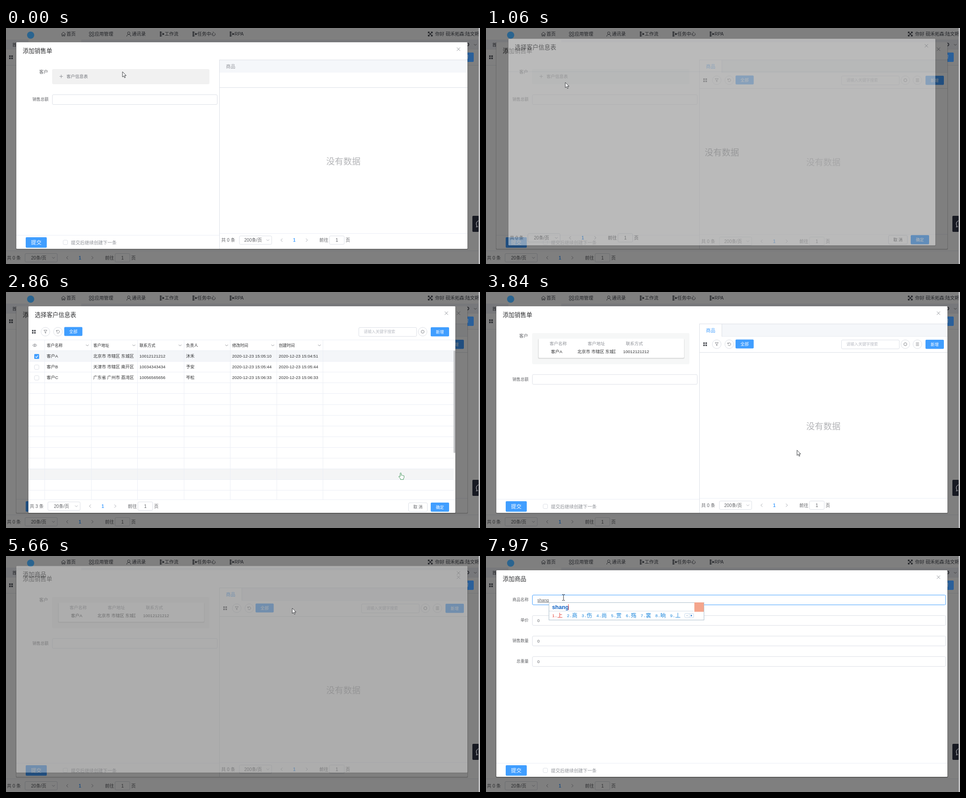
Recreate the animation shown at these times as an HTML page. Size 1058 by 529 pixels, loop 8 s.

```html
<!DOCTYPE html>
<html lang="zh">
<head>
<meta charset="utf-8">
<style>
html, body { margin: 0; width: 100%; height: 100%; overflow: hidden; background: #7f7f7f; }
svg { display: block; width: 1058px; height: 529px; }
text { font-family: "Liberation Sans", "Noto Sans CJK SC", "Noto Sans CJK", sans-serif; white-space: pre; }
</style>
</head>
<body>
<svg id="stage" viewBox="0 0 1058 529"></svg>
<script>
const BLUE = '#409eff', LINE = '#dcdfe6', GRID = '#ebeef5', INK = '#303133', GRAY = '#606266', SOFT = '#909399';

// Drawing helpers; text is placed by its vertical centre.
const text = (x, cy, s, size = 10, fill = GRAY, more = '') =>
  `<text x="${x}" y="${cy + size * 0.37}" font-size="${size}" fill="${fill}" ${more}>${s}</text>`;
const mid = (x, cy, s, size, fill, more = '') => text(x, cy, s, size, fill, 'text-anchor="middle" ' + more);
const rect = (x, y, w, h, fill, more = '') =>
  `<rect x="${x}" y="${y}" width="${w}" height="${h}" fill="${fill}" ${more}/>`;
const box = (x, y, w, h, stroke = LINE, fill = '#fff', more = '') =>
  rect(x + .5, y + .5, w - 1, h - 1, fill, `stroke="${stroke}" rx="2.5" ${more}`);
const path = (d, stroke, w = 1, more = '') => `<path d="${d}" fill="none" stroke="${stroke}" stroke-width="${w}" ${more}/>`;
const hline = (x1, x2, y, c = LINE) => rect(x1, y, x2 - x1, 1, c);
const vline = (x, y1, y2, c = LINE) => rect(x, y1, 1, y2 - y1, c);
const group = (id, body) => `<g id="${id}">${body}</g>`;
const chevron = (x, y, c) => path(`M${x - 3} ${y - 1.5}l3 3 3-3`, c, .9);
const cross = (x, y) => path(`M${x - 3.7} ${y - 3.7}l7.4 7.4m0-7.4l-7.4 7.4`, SOFT, 1);
const tiles = (x, y, c) => [[-4, -4], [.8, -4], [-4, .8], [.8, .8]].map(([a, b]) => rect(x + a, y + b, 3.4, 3.4, c)).join('');
const ring = (x, y, r, c, w = 1, fill = 'none') => `<circle cx="${x}" cy="${y}" r="${r}" fill="${fill}" stroke="${c}" stroke-width="${w}"/>`;
const button = (x, y, w, h, label, size = 9, id = '') =>
  rect(x, y, w, h, BLUE, `rx="2" id="${id}"`) + mid(x + w / 2, y + h / 2, label, size, '#fff');
const panel = (x, w, title) =>
  rect(x - 1, 33, w + 2, 464, '#000', 'opacity=".18" rx="2"') + rect(x, 32, w, 463, '#fff', 'rx="1.5"') +
  text(x + 14.3, 51, title, 13.2, INK) + cross(x + w - 20, 47.5);

function pager(x, cy, count, size, dim) {
  const c = dim ? '#2b2c2e' : GRAY, border = dim ? '#6c6d70' : LINE, fill = dim ? '#7f7f7f' : '#fff', soft = dim ? '#4a4b4e' : '#a5a8af';
  return text(x, cy, `共 ${count} 条`, 10, c) + box(x + 40, cy - 10, 73, 20, border, fill) +
    mid(x + 71, cy, size + '条/页', 10, c) + chevron(x + 104, cy, soft) +
    path(`M${x + 136.5} ${cy - 3.5}l-3.5 3.5 3.5 3.5M${x + 189} ${cy - 3.5}l3.5 3.5-3.5 3.5`, soft) +
    mid(x + 163, cy, '1', 10, dim ? '#1f4f80' : BLUE, 'font-weight="700"') +
    text(x + 219, cy, '前往', 10, c) + box(x + 241, cy - 10, 34, 20, border, fill) +
    mid(x + 258, cy, '1', 10, c) + text(x + 277.5, cy, '页', 10, c);
}

function toolbar(x, sx, cy, list, id) {
  const end = sx + (list ? 188 : 161), ic = '#70737a';
  return tiles(x, cy, '#4a4d53') + ring(x + 26, cy, 9.8, LINE) + ring(x + 54, cy, 9.8, LINE) +
    path(`M${x + 22.5} ${cy - 3.5}h7l-2.7 3.5v3.5l-1.6-1v-2.5z`, ic, .8) +
    path(`M${x + 51} ${cy - 1.5}a3.3 3.3 0 1 1 0 3M${x + 50.5} ${cy - 3.5}v2.5h2.5`, ic, .9) +
    button(x + 68, cy - 10.5, 40.5, 20, '全部', 9.3) +
    box(sx, cy - 10, 130, 21) + text(sx + 11.5, cy, '请输入关键字搜索', 8.8, '#b9bcc4') +
    ring(sx + 143, cy, 9.8, LINE) + ring(sx + 143, cy, 3.4, ic, .9) +
    (list ? ring(sx + 170, cy, 9.8, LINE) + path(`M${sx + 166.5} ${cy - 3}h7m-7 3h7m-7 3h7`, ic, .9) : '') +
    button(end, cy - 10, 41, 20.5, '新增', 9, id);
}

const submitBar = right =>
  hline(23, right, 464, GRID) + button(44, 469, 47, 23.5, '提交', 11.7) +
  box(127, 475, 11, 11) + text(145, 481, '提交后继续创建下一条', 10.2, '#8f9298');

function page() {
  const c = '#202226';
  const flow = x => [8, 12, 16].map(y => rect(x - 4.5, y, 3, 3, c)).join('') +
    path(`M${x - 2} 9.5h3m-3 4h4m-4 4h3`, c, .9) + ring(x + 3, 13.5, 1.6, c, 1, c);
  const icons = path('M123.5 14l4.7-5 4.7 5m-8-1v5h2.3v-3h2v3h2.3v-5', c, .9) +
    [[188, 11], [194, 11], [188, 17], [194, 17]].map(([x, y]) => ring(x, y, 2.2, c, .9)).join('') +
    ring(274, 11.5, 2.8, c, .9) + path('M269.5 19c0-6 9-6 9 0', c, .9) + [348, 421, 504].map(flow).join('');
  const nav = [[135, '首页'], [198, '应用管理'], [281, '通讯录'], [354, '工作流'], [427, '任务中心'], [510, 'RPA']];
  return rect(0, 0, 1058, 529, '#7f7f7f') + rect(0, 26, 1055, 22, '#77787b') + rect(50, 26, 118, 22, '#7f7f7f') +
    hline(0, 1055, 47, '#727376') + hline(0, 1055, 83, '#737477') + hline(0, 1055, 499, '#757679') +
    `<circle cx="55" cy="16" r="8" fill="#2a648f"/>` + icons +
    nav.map(([x, s]) => text(x, 13.5, s, 10.3, c)).join('') +
    path('M942.5 9l9 9m0-9l-9 9M942.5 12v-3h3m3 0h3v3m0 3v3h-3m-3 0h-3v-3', c, 1.4) +
    text(958, 13.5, '你好 砚禾拓森:陆文朔', 10.3, c) + text(14, 37, '首页', 9.5, c) +
    ring(1030, 37, 3, c, 1.5) + chevron(1047.5, 37.5, '#333') + tiles(11, 65.5, '#25272b') +
    rect(1003, 55, 41, 21, '#2a609a', 'rx="2"') + mid(1023.5, 65, '新增', 9, '#a0a0a0') +
    pager(2, 515, 0, 20, true) + rect(1041, 421, 15, 36, '#171922', 'rx="2"') +
    path('M1056 432a7 7 0 0 0-5 11l-1 3 4-1', '#a8a8ac', 1.2) + rect(1055, 0, 3, 529, '#c4c4c6');
}

function orderForm() {
  const field = y => box(103, y, 369, 23) + text(59, y + 11, '销售总额', 9);
  const empty = rect(103, 92, 351, 34, '#f1f1f1', 'rx="3" id="pick"') +
    path('M119.5 108.5h7.5m-3.75-3.75v7.5', SOFT) + text(135, 108.5, '客户信息表', 9.6, '#74777d') + field(149);
  const filled = rect(103, 92, 351, 70, '#f6f7f7', 'rx="3"') + rect(116, 105, 327, 45, '#000', 'opacity=".1" rx="3"') +
    rect(117.5, 104.5, 324.5, 43, '#fff', 'rx="2"') +
    [[142, '客户名称'], [227, '客户地址'], [312, '联系方式']].map(([x, s]) => text(x, 115, s, 9.6, SOFT)).join('') +
    text(145, 133, '客户A', 9.5, INK) + `<svg x="204" y="124" width="85" height="18">${text(0, 9, '北京市 市辖区 东城区', 9.5, INK)}</svg>` +
    text(306, 133, '10012121212', 9.5, INK) + field(184.5);
  const nothing = y => mid(753, y, '没有数据', 19.2, '#b4b5b8');
  const early = text(491, 86.5, '商品', 10.4, SOFT) + hline(477, 1030, 133) + nothing(299) + hline(477, 1030, 460, GRID) + pager(480.5, 475.5, 0, 200);
  const ready = hline(527, 1030, 99, '#e8ebf1') + rect(477, 72, 49, 29, '#fff') + vline(526, 72, 100) + text(491, 86.5, '商品', 10.4, BLUE) +
    toolbar(489, 793, 117, true, 'add') + hline(477, 1030, 135) + nothing(301) + hline(477, 1030, 462, GRID) + pager(480.5, 478, 0, 200);
  return panel(23, 1007, '添加销售单') + text(74, 98, '客户', 10) + group('empty', empty) + group('filled', filled) +
    rect(477, 71, 553, 29, '#f5f7fa') + hline(476, 1030, 71) + group('early', early) + group('ready', ready) +
    vline(476, 71, 495) + submitBar(476);
}

const ROW = 24.1, COLS = [86, 190, 293, 397, 500, 604, 707];

function picker() {
  const heads = ['客户名称', '客户地址', '联系方式', '负责人', '修改时间', '创建时间'];
  const rows = [
    ['客户A', '北京市 市辖区 东城区', '10012121212', '沐禾', '15:05:10', '15:04:51'],
    ['客户B', '天津市 市辖区 南开区', '10034343434', '予安', '15:05:44', '15:05:44'],
    ['客户C', '广东省 广州市 荔湾区', '10056565656', '岑松', '15:06:33', '15:06:33']];
  let grid = hline(50, 1003, 107, GRID) + hline(50, 1003, 131, GRID);
  for (let i = 1; i < 14; i++) grid += hline(50, 999, Math.round(131 + i * ROW), GRID);
  grid += COLS.map(x => vline(x, 107, 465, GRID)).join('') + hline(50, 1003, 465, GRID);
  grid += heads.map((s, i) => text(COLS[i] + 5, 119.5, s, 8.9, INK, 'font-weight="500"') + chevron(COLS[i] + 95.5, 119.5, '#7d8087')).join('');
  grid += path('M59.5 119.5q4.7-6 9.4 0q-4.7 6-9.4 0z', '#70737a', .9) + ring(64.2, 119.5, 1.3, '#70737a', .9);
  const cells = rows.map((r, i) => box(63, 139 + i * 24, 11, 11) + r.map((s, j) =>
    text(COLS[j] + 4.7, 143 + i * 24, j > 3 ? '2020-12-23 ' + s : s, 9.5, INK)).join('')).join('');
  return panel(50, 953, '选择客户信息表') +
    group('blank', hline(50, 1003, 105, GRID) + mid(526.5, 286.5, '没有数据', 19.2, '#b4b5b8') + pager(53, 478, 0, 20)) +
    group('table', rect(50, 131, 949, 24, '#f4f6f9', 'id="current"') + rect(50, 131, 949, 24, '#f4f5f6', 'id="hover"') +
      toolbar(62, 787, 89, false) + grid + group('cells', cells + rect(999, 131, 4, 230, '#c2c3c6', 'rx="2"')) +
      group('tick', rect(63, 139, 11, 11, BLUE, 'rx="1.5"') + path('M65.6 144.6l2.2 2.3 3.8-4.6', '#fff', 1.3)) + pager(53, 480, 3, 20)) +
    box(898, 472, 43, 20.5) + mid(919.5, 482, '取 消', 9, GRAY) + button(948, 472, 41, 20.5, '确定', 9, 'ok');
}

function goodsForm() {
  const fields = ['商品名称', '单价', '销售数量', '总重量'].map((s, i) => {
    const y = 87 + i * 46;
    return text(95, y + 10.5, s, 9, GRAY, 'text-anchor="end"') + box(103, y, 923.5, 23, LINE, '#fff', i ? '' : 'id="name"') +
      (i ? text(114.5, y + 11, '0', 9.5) : '');
  }).join('');
  return panel(23, 1007, '添加商品') + path('', '#6aa6e6', 1.5, 'id="spin" stroke-linecap="round"') +
    group('fields', fields + submitBar(1030) + rect(114, 92, 1, 12, '#333', 'id="caret"'));
}

// Input-method popup for the letters typed so far.
const typed = [
  [7330, 's', '是 说 上 三 时 四 所 算 谁'],
  [7560, 'sh', '上 是 说 时候 什么 生活 事 十 手'],
  [7724, 'sha', '啥 沙 杀 傻 莎 纱 煞 砂 厦'],
  [7806, 'shan', '山 善 闪 衫 删 扇 杉 珊 陕'],
  [7970, 'shang', '上 商 伤 尚 赏 殇 裳 晌 丄']];

function ime([, word, list]) {
  const x = Math.round(114 + word.length * 5.25), wide = 12;
  let cx = x + 7.5, items = '';
  list.split(' ').forEach((s, i) => {
    const c = i ? '#1a86dc' : '#e33a30';
    items += text(cx, 133.5, i + 1 + '.', 9.6, c, 'style="font-family:\'Liberation Mono\',monospace"') + text(cx + 11.5, 133.3, s, wide, c);
    cx += 32.9 + (s.length - 1) * wide;
  });
  const w = cx + 43.5 - x, len = word.length * 7.1;
  return text(114.5, 98, word, 9.5) + hline(115, x, 103, '#555') +
    rect(x + .5, 104.5, w - 1, 39, '#fff', 'stroke="#a9bccb"') + hline(x + 1, x + w - 24, 123, '#d5dee6') +
    text(x + 7.5, 114, word, 12.6, '#0f62c4', 'font-weight="700"') + rect(x + 8 + len, 108, 1, 13, '#e33a30') + items +
    box(cx - .5, 128, 11, 11, '#c5d8ea') + box(cx + 9.5, 128, 11, 11, '#c5d8ea') +
    `<path d="M${cx + 6} 131.5v4l-2.5-2z" fill="#b5c7d8"/><path d="M${cx + 13.5} 131v5l3-2.5z" fill="#1a70d0"/>` +
    rect(x + w - 22, 104, 21, 21, '#f4a58c');
}

const cursors = group('arrow', '<path d="M0 0V11.8L2.7 9.3 4.6 13.6 6.5 12.8 4.6 8.6H8.3Z" fill="#fff" stroke="#25272c" stroke-width=".9"/>') +
  group('hand', '<path d="M-1.2 9V1.2Q0-.6 1.2 1.2V6Q2.4 4.6 3.6 6.3 4.8 5.3 5.8 6.8 7.8 6 7.6 8.5 7.8 12 6.2 13.2V15.3H-.5V13.6L-4 9.6Q-4.6 7.2-2.4 8.2Z" fill="#fff" stroke="#2f8a4a" stroke-width=".9"/>') +
  group('beam', path('M-3-6.5h2.2l.8.8.8-.8H3M0-5.5v11M-3 6.5h2.2l.8-.8.8.8H3', '#25272c', 1));

document.getElementById('stage').innerHTML = page() + group('order', orderForm()) +
  rect(23, 32, 1007, 463, '#000', 'id="dim" opacity=".5"') + group('picker', picker()) + group('goods', goodsForm()) +
  group('ime', '') + group('cursor', cursors);

const $ = id => document.getElementById(id);
const show = (id, on) => { $(id).style.display = on ? '' : 'none'; };

// Screen refreshes: first time, last time, count.
const bursts = [[0], [70, 590, 7], [810, 1060, 4], [1150], [1300, 1850, 7], [2000, 2070, 2], [2370, 2450, 2],
  [2630, 2860, 4], [3010, 3370, 6], [3530, 4070, 8], [4220, 5020, 11], [5090], [5170, 5660, 6], [5760, 5820, 2],
  [5940, 6580, 10], [6950], [7330], [7560, 7970, 6]];
const ticks = bursts.flatMap(([a, b = a, n = 1]) =>
  Array.from({ length: n }, (_, i) => Math.round(a + (n > 1 ? i * (b - a) / (n - 1) : 0))));

// Pointer route: time, x, y.
const route = [[0, 260, 98], [400, 128, 106], [590, 168, 118], [1060, 177, 122], [1300, 172, 124], [1850, 85, 142],
  [1950, 85, 142], [2070, 70, 142], [2560, 70, 142], [2860, 881, 405], [2940, 881, 405], [3370, 968, 478],
  [3610, 968, 478], [4070, 418, 230], [4140, 418, 230], [4700, 782, 136], [5020, 934, 130], [5090, 975, 128],
  [5270, 1000, 117], [5460, 1000, 117], [5660, 639, 117], [5820, 264, 64], [6300, 173, 93], [8000, 173, 93]];

function pointer(t) {
  const i = route.findIndex(p => p[0] > t), [t0, x0, y0] = route[i - 1], [t1, x1, y1] = route[i];
  const k = (t - t0) / (t1 - t0);
  return [x0 + (x1 - x0) * k, y0 + (y1 - y0) * k];
}

function dialog(id, t, from, to) {
  const x = Math.min(1, Math.max(0, (t - from) / 220)), p = 1 - (1 - x) ** 2;
  show(id, t >= from && t < to);
  $(id).setAttribute('opacity', p ** 1.6);
  $(id).setAttribute('transform', `translate(0 ${-20 * (1 - p)})`);
}

function spin(t) {
  const s = (t - 5820) / 1000, mid = Math.PI / 2 + s * 4, half = .5 + Math.min(1.4, s * 2.4);
  const at = a => `${526 + 12.3 * Math.cos(a)} ${283 + 12.3 * Math.sin(a)}`;
  $('spin').setAttribute('d', `M${at(mid - half)}A12.3 12.3 0 ${half > Math.PI / 2 ? 1 : 0} 1 ${at(mid + half)}`);
}

let last = -1;
function draw(now) {
  requestAnimationFrame(draw);
  const clock = now % 8000, t = ticks.filter(v => v <= clock).pop();
  if (t === last) return;
  last = t;
  const [x, y] = pointer(t), closed = 3680, opened = 5591;

  show('early', t < 150);
  show('ready', t >= 150);
  show('empty', t < 3750);
  show('filled', t >= 3750);
  $('pick').setAttribute('fill', t < 970 ? '#f1f1f1' : '#f6f7f7');
  show('dim', t >= 976 && t < closed || t >= opened);
  dialog('picker', t, 976, closed);
  dialog('goods', t, opened, 9000);

  show('blank', t < 1390);
  show('table', t >= 1390);
  show('cells', t >= 1480);
  show('tick', t >= 2370);
  show('current', t >= 2370);
  show('hover', t >= 1480 && y > 131 && y < 465);
  $('hover').setAttribute('y', 131 + Math.floor((y - 131) / ROW) * ROW);
  $('ok').setAttribute('fill', t >= 3300 && t < closed ? '#66b1ff' : BLUE);
  $('add').setAttribute('fill', t >= 5260 && t < 5500 ? '#66b1ff' : BLUE);

  show('spin', t >= 5760 && t < 6200);
  spin(t);
  show('fields', t >= 6200);
  $('name').setAttribute('stroke', t >= 6420 ? BLUE : LINE);
  show('caret', t >= 6420 && t < 6950);
  const word = typed.filter(w => w[0] <= t).pop();
  $('ime').innerHTML = word ? ime(word) : '';

  const hand = t >= 1990 && t < closed || t >= 5260 && t < 5500, beam = t >= 6220;
  show('hand', hand);
  show('beam', beam);
  show('arrow', !hand && !beam);
  $('cursor').setAttribute('transform', `translate(${x} ${y})`);
}
draw(performance.now());
</script>
</body>
</html>
```
